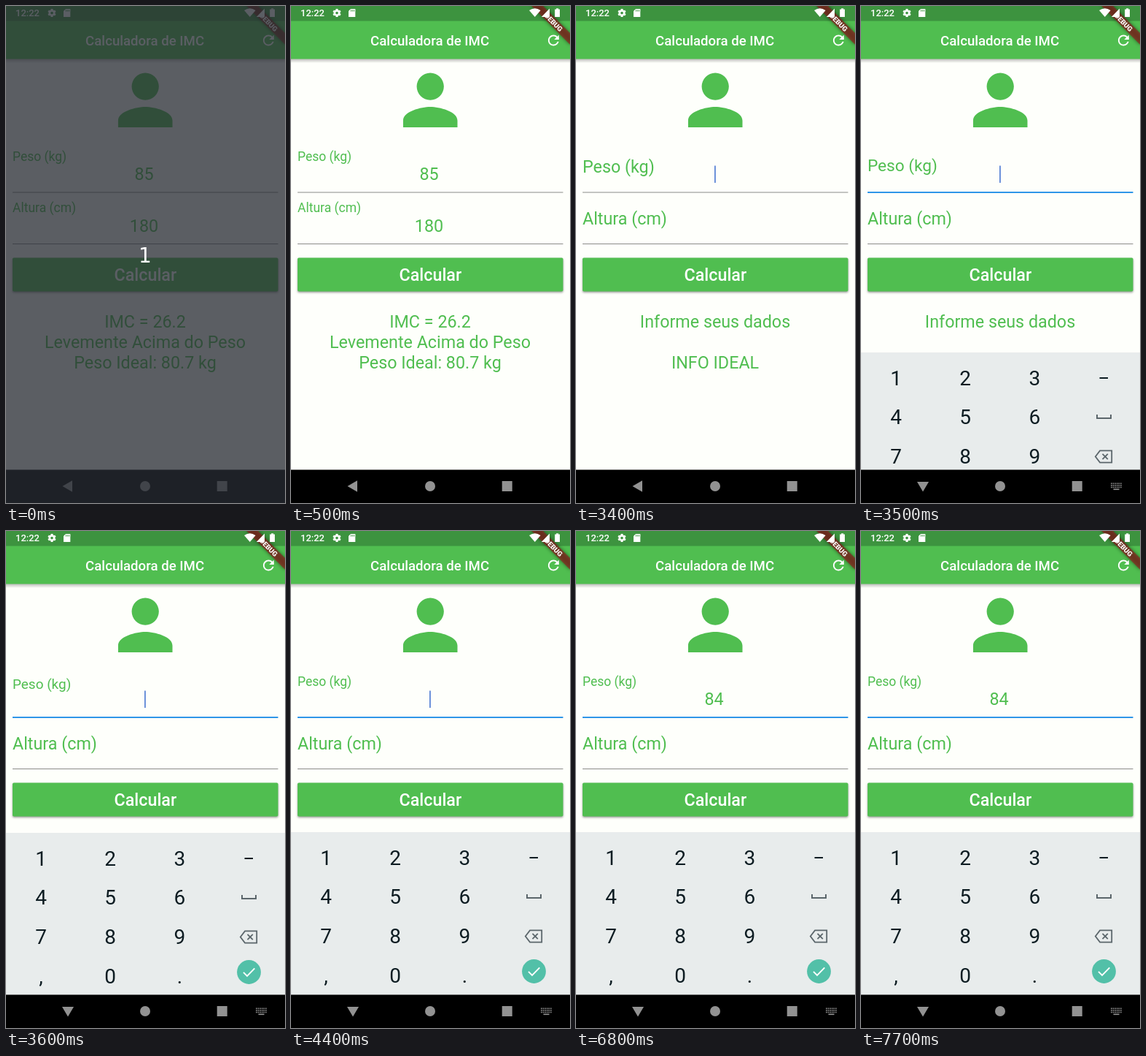
Animation, 383 px wide and 680 px high, one loop 8000 ms. Source, as an HTML page with a canvas:

```html
<!DOCTYPE html>
<html lang="pt">
<head>
<meta charset="utf-8">
<title>Calculadora de IMC</title>
<style>
html, body { margin: 0; width: 100%; height: 100%; overflow: hidden; background: #fefffb; }
canvas { display: block; width: 383px; height: 680px; }
</style>
</head>
<body>
<canvas id="stage"></canvas>
<script>
const W = 383, H = 680, LOOP = 8000, S = 0.932;
const GREEN = '#50be50', PAPER = '#fefffb', WHITE = '#fff';
const canvas = document.getElementById('stage');
const ctx = canvas.getContext('2d');
const dpr = window.devicePixelRatio || 1;
canvas.width = W * dpr;
canvas.height = H * dpr;

const PERSON = new Path2D('M12 12c2.21 0 4-1.79 4-4s-1.79-4-4-4-4 1.79-4 4 1.79 4 4 4zm0 2c-2.67 0-8 1.34-8 4v2h16v-2c0-2.66-5.33-4-8-4z');
const REFRESH = new Path2D('M17.65 6.35C16.2 4.9 14.21 4 12 4c-4.42 0-7.99 3.58-7.99 8s3.57 8 7.99 8c3.73 0 6.84-2.55 7.73-6h-2.08c-.82 2.33-3.04 4-5.65 4-3.31 0-6-2.69-6-6s2.69-6 6-6c1.66 0 3.14.69 4.22 1.78L13 11h7V4l-2.35 2.35z');

const within = (t, a, b) => t >= a && t < b;

function rect(x, y, w, h, color) {
  ctx.fillStyle = color;
  ctx.fillRect(x, y, w, h);
}

function disc(x, y, r, color) {
  ctx.fillStyle = color;
  ctx.beginPath();
  ctx.arc(x, y, r, 0, Math.PI * 2);
  ctx.fill();
}

function trace(points, close) {
  ctx.beginPath();
  points.forEach(([x, y]) => ctx.lineTo(x, y));
  if (close) ctx.closePath();
}

function poly(points, color) {
  trace(points, true);
  ctx.fillStyle = color;
  ctx.fill();
}

function line(points, color, width, close) {
  trace(points, close);
  ctx.strokeStyle = color;
  ctx.lineWidth = width;
  ctx.stroke();
}

function text(str, x, y, size, color, align = 'center', weight = 400, family = 'Roboto') {
  ctx.font = `${weight} ${size}px ${family}, sans-serif`;
  ctx.fillStyle = color;
  ctx.textAlign = align;
  ctx.fillText(str, x, y);
}

function icon(path, x, y, scale, color) {
  ctx.save();
  ctx.translate(x, y);
  ctx.scale(scale, scale);
  ctx.fillStyle = color;
  ctx.fill(path);
  ctx.restore();
}

function appBar(t) {
  const shade = ctx.createLinearGradient(0, 72, 0, 78);
  shade.addColorStop(0, 'rgba(0,0,0,.28)');
  shade.addColorStop(1, 'rgba(0,0,0,0)');
  rect(0, 72, W, 6, shade);
  rect(0, 0, W, 72.5, GREEN);
  rect(0, 0, W, 20.5, '#3d933f');
  const glow = within(t, 2200, 2300) ? 0.09 : within(t, 2300, 2400) ? 0.045 : 0;
  if (glow) {
    ctx.save();
    ctx.beginPath();
    ctx.rect(0, 0, W, 72.5);
    ctx.clip();
    disc(360.5, 47, 33, `rgba(255,255,255,${glow})`);
    ctx.restore();
  }
  text('Calculadora de IMC', 190.6, 53.7, 18.64, WHITE, 'center', 500);
  icon(REFRESH, 349.2, 35.8, S, WHITE);
}

function banner() {
  ctx.save();
  ctx.translate(W, 0);
  ctx.rotate(Math.PI / 4);
  ctx.scale(S, S);
  ctx.filter = 'blur(2.5px)';
  rect(-40, 28, 80, 12, 'rgba(0,0,0,.5)');
  ctx.filter = 'none';
  rect(-40, 28, 80, 12, 'rgba(150,24,28,.63)');
  text('DEBUG', 0, 37.7, 10.2, WHITE, 'center', 900);
  ctx.restore();
}

function statusBar() {
  text('12:22', 13, 14.3, 13, WHITE, 'left', 500);
  ctx.save();
  ctx.translate(63, 9.5);
  for (let i = 0; i < 6; i++) {
    rect(-1.5, -5.6, 3, 3, WHITE);
    ctx.rotate(Math.PI / 3);
  }
  ctx.beginPath();
  ctx.arc(0, 0, 3.1, 0, Math.PI * 2);
  ctx.strokeStyle = WHITE;
  ctx.lineWidth = 2.6;
  ctx.stroke();
  ctx.restore();
  poly([[82, 4], [88.3, 4], [88.3, 15], [79, 15], [79, 7]], WHITE);
  [82, 84, 86].forEach(x => rect(x, 5.3, 1, 2.2, '#3d933f'));

  ctx.beginPath();
  ctx.moveTo(334.8, 15);
  ctx.lineTo(327, 6);
  ctx.quadraticCurveTo(334.8, 0.6, 342.6, 6);
  ctx.fillStyle = WHITE;
  ctx.fill();
  poly([[355, 3.5], [355, 15], [343.8, 15]], WHITE);
  rect(362.2, 4.5, 6.8, 10.5, WHITE);
  rect(364, 3.3, 3.2, 1.5, WHITE);
}

function field(label, y, value, float, focused) {
  text(label, 9, y + 11.5 + 16.5 * (1 - float), 23.3 - 5.8 * float, GREEN, 'left');
  text(value, 189.5, y + 38.4, 23.3, GREEN);
  if (focused) rect(9, y + 54, 364.5, 2, '#2f96e8');
  else rect(9, y + 54.5, 364.5, 1, '#8c8c8a');
}

function button() {
  ctx.save();
  ctx.shadowColor = 'rgba(0,0,0,.4)';
  ctx.shadowBlur = 3 * dpr;
  ctx.shadowOffsetY = 1.5 * dpr;
  ctx.fillStyle = GREEN;
  ctx.beginPath();
  ctx.roundRect(9, 344.5, 364.5, 46, 1.8);
  ctx.fill();
  ctx.restore();
  text('Calcular', 191.3, 375.8, 23.3, WHITE, 'center', 500);
}

function keyboard(t) {
  const drop = t < 3600 ? 62 : t < 3700 ? 1 : 0;
  const ink = '#0d1c22', soft = '#5b666b';
  ctx.save();
  ctx.beginPath();
  ctx.rect(0, 0, W, 635);
  ctx.clip();
  ctx.translate(0, drop);
  rect(0, 412, W, 230, '#e8ecec');
  if (within(t, 5300, 5500)) disc(124, 554, 26, 'rgba(0,0,0,.07)');
  if (within(t, 6100, 6200)) disc(67, 487, 26, 'rgba(0,0,0,.07)');
  ['123', '456', '789', ',0.'].forEach((row, r) =>
    [...row].forEach((key, c) => text(key, 48 + 95.2 * c, 456.5 + 53.9 * r, 28, ink)));
  rect(327.5, 446, 11.5, 2, ink);
  line([[324, 497], [324, 502], [343, 502], [343, 497]], soft, 2);
  line([[321.8, 554.5], [328, 546.4], [344.2, 546.4], [344.2, 562.6], [328, 562.6]], soft, 1.8, true);
  line([[331.5, 550.8], [338.8, 558.2]], soft, 1.8);
  line([[338.8, 550.8], [331.5, 558.2]], soft, 1.8);
  disc(333.5, 602.5, 16.4, '#52c0a8');
  line([[326, 602.8], [331, 607.8], [341.3, 597.3]], WHITE, 1.9);
  ctx.restore();
}

function navBar(open) {
  const gray = '#929292';
  rect(0, 634.5, W, 46, '#000');
  poly(open ? [[77, 651], [93, 651], [85, 664.5]] : [[77.5, 657], [91, 649.2], [91, 664.8]], gray);
  disc(191, 657, 7, gray);
  rect(289.7, 650, 14, 14, gray);
  if (!open) return;
  for (let r = 0; r < 3; r++)
    for (let c = 0; c < 6; c++) rect(343 + c * 2.6, 652.5 + r * 2.6, 1.6, 1.6, gray);
  rect(346.5, 660.5, 8, 1.6, gray);
}

function cursor(t) {
  const on = within(t, 3400, 3900) || within(t, 4400, 4900) || within(t, 5500, 5800) ||
    within(t, 6200, 6800) || within(t, 7300, 7700);
  if (!on) return;
  const x = t < 5500 ? 190 : t < 6200 ? 196.6 : 203.1;
  rect(x, 218.5, 1.8, 23.4, '#5c86d6');
}

function draw(t) {
  const done = t < 2200, open = t >= 3500;
  const float = done || t >= 3700 ? 1 : t >= 3600 ? 0.75 : t >= 3500 ? 0.12 : 0;
  const weight = done ? '85' : t < 5500 ? '' : t < 6200 ? '8' : '84';

  ctx.setTransform(dpr, 0, 0, dpr, 0, 0);
  rect(0, 0, W, H, PAPER);
  appBar(t);
  icon(PERSON, 135.3, 72.8, 4.66, GREEN);
  field('Peso (kg)', 200, weight, float, open);
  field('Altura (cm)', 270.5, done ? '180' : '', done ? 1 : 0, false);
  cursor(t);
  button();
  const info = done
    ? ['IMC = 26.2', 'Levemente Acima do Peso', 'Peso Ideal: 80.7 kg']
    : ['Informe seus dados', '', 'INFO IDEAL'];
  info.forEach((s, i) => text(s, 191, 440.4 + 27.8 * i, 23.3, GREEN));
  banner();
  statusBar();
  if (open) keyboard(t);
  navBar(open);

  // countdown veil
  if (t < 500) {
    rect(0, 0, W, H, 'rgba(40,44,52,.76)');
    text('1', 191, 351, 28, WHITE, 'center', 400, '"DejaVu Sans"');
  }
}

function tick() {
  draw(performance.now() % LOOP);
  requestAnimationFrame(tick);
}
tick();
</script>
</body>
</html>
```
